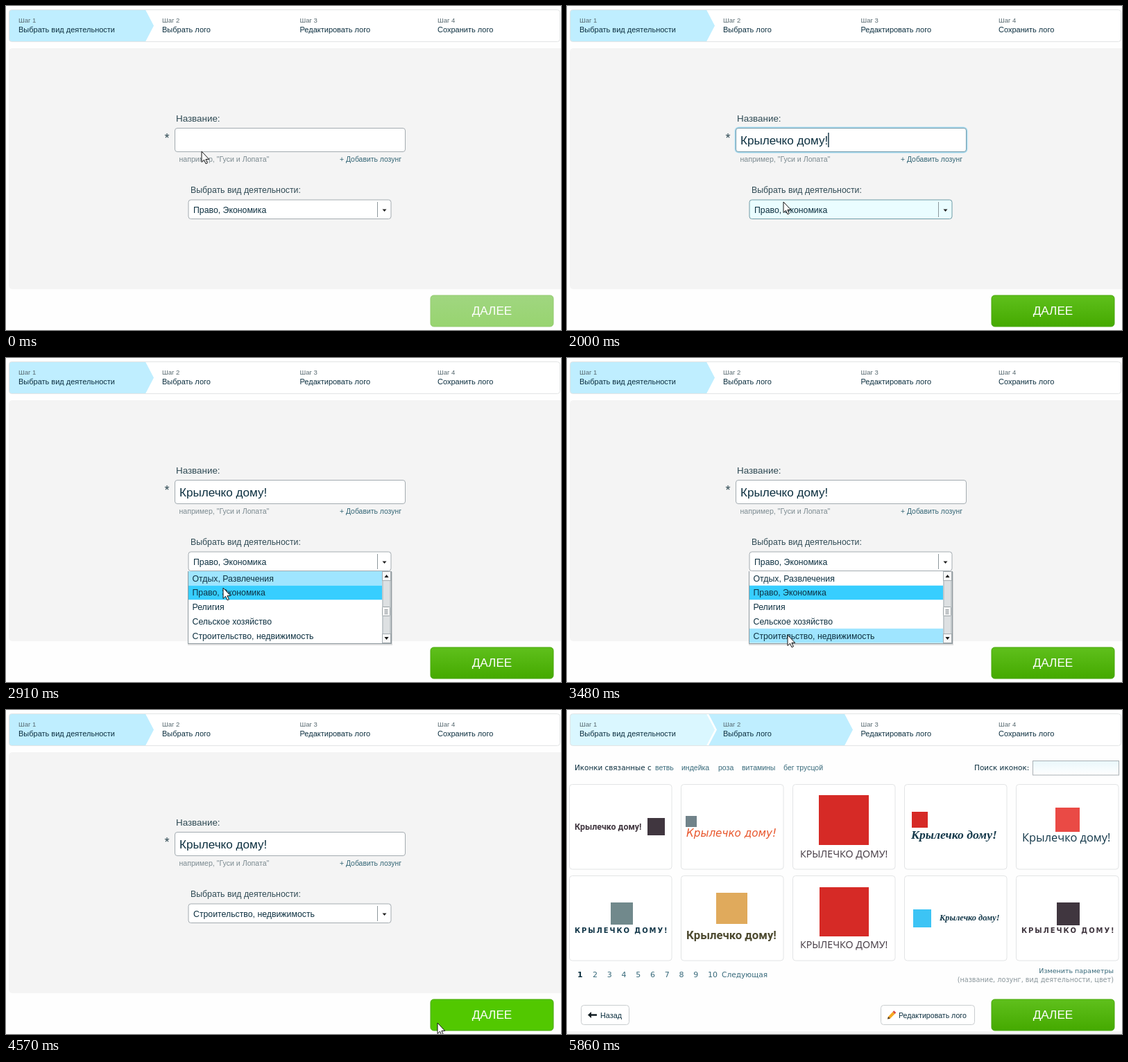
Animation of 800x468 px, one loop 6.51 s. Source, as an HTML page:

```html
<!DOCTYPE html>
<html lang="ru">
<head>
<meta charset="utf-8">
<title>Мастер логотипов</title>
<style>
html, body { margin: 0; width: 100%; height: 100%; overflow: hidden; background: #fff; }
svg { display: block; width: 800px; height: 468px; }
text { font-family: "Liberation Sans", Arial, sans-serif; fill: #0d3040; white-space: pre; }
.dv { font-family: "DejaVu Sans", sans-serif; }
.os { font-family: "Open Sans", sans-serif; }
.rb { font-family: Roboto, sans-serif; font-weight: bold; }
.it { font-family: "DejaVu Sans", sans-serif; font-style: italic; }
.sc { font-family: "Liberation Serif", serif; font-weight: bold; font-style: italic; }
.wd { font-family: "DejaVu Sans", sans-serif; font-weight: bold; letter-spacing: 1.9px; }
</style>
</head>
<body>
<svg id="stage" viewBox="0 0 800 468" xmlns="http://www.w3.org/2000/svg"></svg>
<script>
const LOOP = 6510;
const NAME = 'Крылечко дому!';
const OLD_KIND = 'Право, Экономика', NEW_KIND = 'Строительство, недвижимость';
const ROWS = ['Отдых, Развлечения', OLD_KIND, 'Религия', 'Сельское хозяйство', NEW_KIND];
const ROW_H = 20.7, LIST_H = 104, LIST_Y = 308;

// moments at which the screen is refreshed
const TICKS = [0, 130, 270, 390, 540, 670, 1060, 1190, 1460, 1610, 1730, 1850, 2000, 2130, 2250,
  2390, 2510, 2660, 2790, 2910, 3050, 3170, 3330, 3480, 3880, 4030, 4150, 4300, 4450, 4570,
  4690, 4830, 4960, 5080, 5230, 5350, 5470, 5590, 5730, 5860];

// pointer waypoints: time, x, y
const PATH = [[0, 282, 210], [130, 280, 202], [270, 277, 198], [390, 284, 195], [1460, 284, 195],
  [1850, 311, 279], [2000, 312, 283], [2660, 312, 283], [2910, 313, 332], [3170, 314, 376],
  [3330, 315, 396], [3480, 318, 400], [4150, 318, 400], [4300, 374, 402], [4570, 622, 452],
  [5230, 638, 446]];

const clamp = v => Math.max(0, Math.min(1, v));
const text = (x, y, size, str, attr = '') =>
  `<text x="${x}" y="${y}" font-size="${size}" ${attr}>${str}</text>`;
const rect = (x, y, w, h, fill, attr = '') =>
  `<rect x="${x}" y="${y}" width="${w}" height="${h}" fill="${fill}" ${attr}/>`;
const group = (id, body, attr = '') => `<g id="${id}" ${attr}>${body}</g>`;
const ink = c => `style="fill:${c}"`;
const gradient = (id, a, b) => `<linearGradient id="${id}" x1="0" y1="0" x2="0" y2="1">
  <stop offset="0" stop-color="${a}"/><stop offset="1" stop-color="${b}"/></linearGradient>`;

const defs = `<defs>
  ${gradient('normal', '#5fc01c', '#45a900')}
  ${gradient('pressed', '#48b000', '#52bd08')}
  ${gradient('off', '#a0d680', '#98d470')}
  ${gradient('bar', '#c4c8ca', '#eceeef')}
  ${gradient('search', '#e9f7fb', '#ffffff')}
  <clipPath id="below">${rect(256, LIST_Y, 306, 112, '#000')}</clipPath></defs>`;

function header() {
  const names = ['Выбрать вид деятельности', 'Выбрать лого', 'Редактировать лого', 'Сохранить лого'];
  const xs = [18, 225, 423.5, 622];
  const first = 'M8 5.5H201L213 28.5 201 51.5H8Q4.5 51.5 4.5 48V9Q4.5 5.5 8 5.5Z';
  return rect(4.5, 5.5, 794, 46, '#fff', 'rx="4"')
    + `<path id="stepOne" d="${first}"/>`
    + '<path id="stepTwo" d="M204 5.5H400L412 28.5 400 51.5H204L216 28.5Z" fill="#bfeeff"/>'
    + rect(4.5, 5.5, 794, 46, 'none', 'rx="4" stroke="#e2e4e5"')
    + names.map((n, i) => text(xs[i], 24, 9.5, 'Шаг ' + (i + 1), ink('#56686f'))
      + text(xs[i], 37.5, 11, n)).join('');
}

function form() {
  return text(245, 167, 13.4, 'Название:', ink('#2f4a54'))
    + text(228.5, 197, 18, '*', ink('#2f4a54'))
    + rect(242.5, 175.5, 334, 36, 'none', 'id="glow" rx="5" stroke="#a9dcf0" stroke-width="2"')
    + rect(243.5, 176.5, 332, 34, '#fff', 'id="field" rx="3.5"')
    + text(250, 200, 17.1, '', 'id="name"')
    + rect(0, 183, 1.4, 21, '#0d3040', 'id="caret"')
    + text(249.5, 225, 10.6, 'например, "Гуси и Лопата"', ink('#7b8a90'))
    + text(481, 225, 10.4, '+ Добавить лозунг', ink('#336575'))
    + text(266, 270, 12.3, 'Выбрать вид деятельности:', ink('#2f4a54'))
    + rect(263, 280, 292, 27.5, '#fff', 'id="select" rx="3.5"')
    + '<path d="M535.5 283V305" stroke="#8d979c"/><path d="M542.5 293.5h6l-3 3.5z" fill="#222"/>'
    + text(270, 298.5, 12.3, '', 'id="kind"');
}

function list() {
  const rows = ROWS.map((r, i) => rect(263, LIST_Y + i * ROW_H, 279, ROW_H, '#fff', `id="row${i}"`)
    + text(268.5, 322.7 + i * ROW_H, 12.3, r)).join('');
  const button = (y, d) => rect(542.5, y, 12, 13, '#f7f7f7', 'stroke="#a5acb0"')
    + `<path d="${d}" fill="#111"/>`;
  const grip = [363.5, 365.5, 367.5, 369.5].map(y => `<path d="M545.5 ${y}h5" stroke="#8b9297"/>`).join('');
  const body = rect(262, LIST_Y + 1, 295, LIST_H + 2, '#000', 'opacity=".12"')
    + rect(262.5, LIST_Y - .5, 293, LIST_H + 1, '#fff', 'stroke="#8f9a9f"') + rows
    + rect(542, LIST_Y, 13, LIST_H, '#c3c9cc') + rect(544, 321, 9, 77, '#dde0e2')
    + button(308.5, 'M545.5 317h6l-3-4z') + button(398.5, 'M545.5 403h6l-3 4z')
    + rect(542.5, 359.5, 11, 13, '#f8f8f8', 'rx="1" stroke="#9aa2a6"') + grip;
  return `<g clip-path="url(#below)">${group('list', body)}</g>`;
}

function extraButtons() {
  const box = (x, w) => rect(x, 426.5, w, 28, '#fff', 'rx="4" stroke="#c9cdcf"');
  return box(20.5, 69)
    + '<path d="M30 440.5l5-4.5v3.2h8v2.6h-8v3.2z" fill="#111c22"/>'
    + text(48, 444.5, 10.8, 'Назад')
    + box(452.5, 135)
    + '<path d="M463 443l6.5-7 3 3-6.500 6.500-4 1z" fill="#f6a821"/>'
    + '<path d="M469.500 436l1.800-1.700 3 3-1.800 1.700z" fill="#d9483b"/>'
    + '<path d="M462 446.500l1-3.500 3 2.500z" fill="#4a3a2c"/>'
    + text(478, 444.5, 10.6, 'Редактировать лого');
}

function resultBars() {
  const tags = [[127, 'ветвь'], [165, 'индейка'], [218, 'роза'], [252, 'витамины'], [312, 'бег трусцой']];
  const link = ink('#37697a');
  let s = text(11, 87, 10.4, 'Иконки связанные с', 'class="dv"')
    + tags.map(([x, w]) => text(x, 87, 10.5, w, link)).join('')
    + text(587, 87, 10.5, 'Поиск иконок:', 'class="dv"')
    + rect(671.5, 73.5, 124, 20.5, 'url(#search)', 'stroke="#a9b0b4"')
    + text(15, 386, 11, '1', 'class="dv" font-weight="bold"');
  for (let i = 2; i <= 10; i++) s += text(37 + (i - 2) * 20.75, 386, 11, i, 'class="dv" ' + link);
  return s + text(223, 386, 10.6, 'Следующая', 'class="dv" ' + link)
    + text(788, 380, 9.5, 'Изменить параметры', 'class="dv" text-anchor="end" ' + link)
    + text(788, 393, 9.7, '(название, лозунг, вид деятельности, цвет)',
      'class="dv" text-anchor="end" ' + ink('#8b979c'))
    + rect(0, 464, 800, 4, '#f4f4f4');
}

function cards() {
  const dark = '#40363f', navy = '#14384a', red = '#d62a26';
  const upper = NAME.toUpperCase();
  // text x, y, size, class, colour, string, then mark x, y, side, colour
  const items = [
    [11, 173, 12.4, 'rb', dark, NAME, 116, 156, 25, dark],
    [172, 183, 15.2, 'it', '#e8562c', NAME, 171, 153, 16, '#71838a'],
    [336, 213, 14.2, 'os', dark, upper, 363, 123, 72, red],
    [496, 186, 17.6, 'sc', navy, NAME, 497, 147, 23, red],
    [656, 190, 16.4, 'os', navy, NAME, 704, 141, 35, '#ea4a45'],
    [11, 322, 10, 'wd', navy, upper, 63, 278, 32, '#71898c'],
    [172, 331, 16.7, 'rb', '#4d4a30', NAME, 215, 264, 45, '#e0aa5c'],
    [336, 344, 14.2, 'os', dark, upper, 364, 256, 71, red],
    [537, 304, 12.3, 'sc', navy, NAME, 499, 288, 26, '#3cc4f5'],
    [655, 322, 10, 'wd', dark, upper, 706, 278, 33, dark]
  ];
  return items.map(([x, y, size, cls, color, str, mx, my, side, mark], i) =>
    rect(3.5 + (i % 5) * 161, i < 5 ? 107.5 : 239.5, 147.5, 122.5, '#fff', 'rx="4" stroke="#e2e4e5"')
    + rect(mx, my, side, side, mark)
    + text(x, y, size, str, `class="${cls}" ${ink(color)}`)).join('');
}

const stage = document.getElementById('stage');
stage.innerHTML = defs
  + rect(0, 0, 800, 468, '#fefefe')
  + header()
  + rect(4, 61, 800, 348, '#f4f4f4', 'id="panel" rx="5"')
  + group('form', form())
  + list()
  + group('bars', resultBars())
  + group('cards', cards())
  + group('extra', extraButtons())
  + rect(612, 418, 177, 45, '#52c800', 'id="next" rx="4.5"')
  + text(700.5, 446, 17.2, 'ДАЛЕЕ', 'text-anchor="middle" ' + ink('#fff'))
  + group('pointer', '<path d="M0 0V15.500L3.500 12.200 6 17.800 8.400 16.800 5.900 11.400H10.700Z" '
    + 'fill="#fff" stroke="#111" stroke-linejoin="round"/>');

const el = {};
stage.querySelectorAll('[id]').forEach(n => el[n.id] = n);
const set = (id, attrs) => { for (const k in attrs) el[id].setAttribute(k, attrs[k]); };
const show = (id, on) => set(id, { display: on ? 'inline' : 'none' });

function pointerAt(t) {
  const i = PATH.findIndex(p => p[0] > t);
  if (i < 0) return PATH[PATH.length - 1].slice(1);
  const [t0, x0, y0] = PATH[i - 1], [t1, x1, y1] = PATH[i];
  const k = (t - t0) / (t1 - t0);
  return [x0 + (x1 - x0) * k, y0 + (y1 - y0) * k];
}

function buttonFill(t) {
  if (t < 1060) return 'url(#off)';
  if (t >= 4830 && t < 4960) return 'url(#pressed)';
  return t >= 4570 && t < 5860 ? '#52c800' : 'url(#normal)';
}

function hoverRow(t) {
  if (t < 2790) return -1;
  if (t < 3050) return 0;
  if (t < 3170) return 1;
  return t < 3330 ? 2 : 4;
}

function draw(now) {
  const t = TICKS.filter(v => v <= now).pop();
  const second = t >= 5230;

  set('stepOne', { fill: second ? '#daf7ff' : '#bfeeff' });
  show('stepTwo', second);
  show('panel', !second);
  show('extra', second);
  set('form', { opacity: clamp((5590 - t) / 240) });

  const focus = t >= 540 && t < 2130;
  const typed = t < 1060 ? 0 : t < 1190 ? 8 : NAME.length;
  show('glow', focus);
  set('field', { stroke: focus ? '#7199aa' : '#a3abb0' });
  el.name.textContent = NAME.slice(0, typed);
  const caretOn = focus && t >= 670 && (t < 1460 || t >= 2000);
  show('caret', caretOn);
  if (caretOn) set('caret', { x: typed ? 250 + el.name.getComputedTextLength() : 251 });

  const over = t >= 2000 && t < 2790;
  set('select', { fill: over ? '#eafdff' : '#fff', stroke: over ? '#6f9aa5' : '#a3abb0' });
  el.kind.textContent = t < 4030 ? OLD_KIND : NEW_KIND;

  const open = clamp(Math.min(t - 2073, 4300 - t) / 400);
  show('list', open > 0);
  set('list', { transform: `translate(0 ${(open - 1) * LIST_H})` });
  const picked = t < 3880 ? 1 : 4, hover = hoverRow(t);
  ROWS.forEach((r, i) =>
    set('row' + i, { fill: i === picked ? '#37ceff' : i === hover ? '#9fe5ff' : '#fff' }));

  set('next', { fill: buttonFill(t), stroke: t < 1060 ? '#93cb70' : '#48a80a' });
  show('bars', t >= 5590);
  set('cards', { opacity: clamp((t - 5600) / 260) });

  show('pointer', t < 5860);
  set('pointer', { transform: `translate(${pointerAt(t).join(' ')})` });
}

const start = performance.now();
function loop() {
  draw((performance.now() - start) % LOOP);
  requestAnimationFrame(loop);
}
loop();
</script>
</body>
</html>
```
